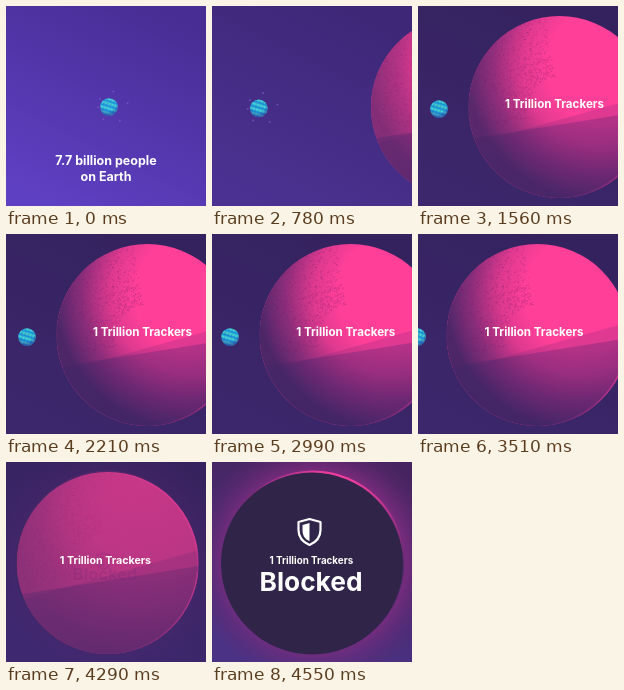
Recreate the animation shown at these times as an HTML page with a canvas. Size 200 by 200 pixels, loop 5870 ms.

```html
<!DOCTYPE html>
<html lang="en">
<head>
<meta charset="utf-8">
<title>Trackers</title>
<style>
html, body { margin: 0; width: 100%; height: 100%; overflow: hidden; background: #4a2f96; }
canvas { display: block; width: 200px; height: 200px; }
</style>
</head>
<body>
<canvas id="stage" width="200" height="200"></canvas>
<script>
const ctx = document.getElementById('stage').getContext('2d');
const LOOP = 5870, STEP = 130, LAST = 4550, TAU = Math.PI * 2, R = 91;

const ramp = (t, from, to) => Math.min(1, Math.max(0, (t - from) / (to - from)));
const ease = (t, from, to) => {
  const u = ramp(t, from, to);
  return u < .5 ? 4 * u ** 3 : 1 - 4 * (1 - u) ** 3;
};
const lerp = (a, b, k) => a + (b - a) * k;
const mix = (a, b, k) => `rgb(${a.map((v, i) => Math.round(lerp(v, b[i], k)))})`;

function fade(g, ...stops) {
  stops.forEach(([p, c]) => g.addColorStop(p, c));
  return g;
}
const linear = (x1, y1, x2, y2, ...stops) => fade(ctx.createLinearGradient(x1, y1, x2, y2), ...stops);
const radial = (x, y, r1, r2, ...stops) => fade(ctx.createRadialGradient(x, y, r1, x, y, r2), ...stops);

function disc(x, y, r, fill) {
  ctx.fillStyle = fill;
  ctx.beginPath();
  ctx.arc(x, y, r, 0, TAU);
  ctx.fill();
}

function text(str, x, y, size, alpha, color = '#fff') {
  ctx.globalAlpha = alpha;
  ctx.fillStyle = color;
  ctx.font = `700 ${size}px Inter, sans-serif`;
  ctx.textAlign = 'center';
  ctx.fillText(str, x, y);
  ctx.globalAlpha = 1;
}

let seed = 7;
const rand = () => (seed = seed * 16807 % 2147483647) / 2147483647;
const grain = Array.from({ length: 900 }, () => {
  const a = Math.PI * lerp(.9, 1.45, rand()), r = R - 60 * rand();
  return [Math.cos(a) * r, Math.sin(a) * r];
});

function sky(night) {
  ctx.fillStyle = linear(150, 0, 50, 200,
    [0, mix([72, 45, 148], [52, 34, 94], night)],
    [1, mix([94, 64, 194], [60, 39, 108], night)]);
  ctx.fillRect(0, 0, 200, 200);
}

function earth(x, y, dots) {
  ctx.save();
  ctx.translate(x, y);
  ctx.globalAlpha = dots;
  for (let i = 0; i < 6; i++) {
    const a = i * 1.1 - 2.4, r = 15 + 4 * Math.cos(a);
    disc(Math.cos(a) * r, Math.sin(a) * r, .9, '#7350c4');
  }
  ctx.globalAlpha = 1;
  ctx.beginPath();
  ctx.arc(0, 0, 8.8, 0, TAU);
  ctx.clip();
  ctx.rotate(.3);
  for (let band = -10; band < 10; band += 1) {
    ctx.fillStyle = mix([24, 150, 226], [70, 222, 214], .5 + .5 * Math.sin(band * 1.35));
    ctx.fillRect(-10, band, 20, 1.2);
  }
  disc(0, 0, 9, radial(-2, -4, 8, 14, [0, 'rgba(45,40,145,0)'], [1, 'rgba(45,40,145,.8)']));
  ctx.restore();
}

// Darkens everything below a slanted edge that starts on the left
function shadow(slope, fill) {
  ctx.fillStyle = fill;
  ctx.beginPath();
  ctx.moveTo(-R, 24 - slope * 50);
  ctx.lineTo(-40, 24);
  ctx.lineTo(R, 24 + slope * 131);
  ctx.lineTo(R, R);
  ctx.lineTo(-R, R);
  ctx.fill();
}

function planet(x, shade) {
  ctx.save();
  ctx.translate(x, 101);
  ctx.beginPath();
  ctx.arc(0, 0, R, 0, TAU);
  ctx.clip();
  ctx.fillStyle = '#ff3f98';
  ctx.fillRect(-R, -R, 2 * R, 2 * R);
  shadow(-.28, 'rgba(130,40,125,.25)');
  shadow(-.16, linear(0, 0, 15, R, [0, 'rgba(120,40,122,.35)'], [1, 'rgba(95,38,112,.65)']));
  ctx.globalAlpha = shade;
  disc(0, 0, R + 1, radial(45, -42, 58, 138,
    [0, 'rgba(80,36,106,0)'], [.3, 'rgba(90,34,106,.2)'], [.65, 'rgba(80,36,106,.68)'], [1, 'rgba(60,37,100,.97)']));
  ctx.globalAlpha = shade * .3;
  ctx.fillStyle = '#70236d';
  for (const [gx, gy] of grain) ctx.fillRect(gx, gy, 1, 1);
  // Lit rim on the lower right
  ctx.globalAlpha = .8;
  ctx.lineWidth = 3;
  ctx.strokeStyle = linear(80, 20, 10, 90, [0, '#e83c94'], [1, 'rgba(200,50,140,0)']);
  ctx.beginPath();
  ctx.arc(0, 0, R, .1, 1.5);
  ctx.stroke();
  ctx.restore();
}

function eclipse(k) {
  ctx.globalAlpha = k;
  ctx.fillStyle = linear(130, 0, 70, 200, [0, '#46245f'], [1, '#4b3285']);
  ctx.fillRect(0, 0, 200, 200);
  ctx.fillStyle = radial(103, 98, R - 3, 126, [0, 'rgba(134,44,130,.8)'], [1, 'rgba(90,40,110,0)']);
  ctx.fillRect(0, 0, 200, 200);
  disc(101, 100, R + .5, radial(130, 10, 15, 120, [0, '#ee3d9c'], [.5, '#a8308c'], [1, '#4b2a68']));
  disc(100, 101.5, R, '#302549');
  ctx.globalAlpha = 1;
}

function shield(y, scale, alpha, color) {
  ctx.save();
  ctx.globalAlpha = alpha;
  ctx.translate(97.5, y);
  ctx.scale(scale, scale);
  ctx.strokeStyle = ctx.fillStyle = color;
  ctx.lineWidth = 2.2;
  ctx.lineJoin = 'round';
  ctx.stroke(new Path2D('M0-13L11-10V-2C11 5 7 10 0 13C-7 10-11 5-11-2V-10Z'));
  ctx.fill(new Path2D('M0-9L-7-7V-2C-7 3-5 7 0 9Z'));
  ctx.restore();
}

function draw(t) {
  const arrive = ease(t, 0, 1365), pan = 40 * ease(t, 2450, 4500);
  const label = ramp(t, 1100, 1500), grow = ease(t, 4030, 4550), reveal = ramp(t, 4200, 4550);
  const shade = lerp(lerp(.65, .95, ramp(t, 1040, 1700)), .35, ease(t, 3500, 4350));

  sky(ramp(t, 0, 1400));
  earth(lerp(103, 21, arrive) - pan, 101 + 2 * arrive, 1 - ramp(t, 780, 1170));
  planet(lerp(486, 141.5, arrive) - pan, shade);
  eclipse(ramp(t, 4250, 4550));

  const intro = 1 - ramp(t, 130, 520);
  text('7.7 billion people', 100, 159, 12.5, intro);
  text('on Earth', 100, 174.5, 12.5, intro);

  const white = mix([120, 38, 120], [255, 255, 255], ramp(t, 4290, 4550));
  const scale = lerp(.25, 1, grow);
  shield(lerp(129, 70, grow), scale, reveal, white);
  text('Blocked', 99, lerp(108, 128.5, grow), 26.3 * scale, reveal, white);
  text('1 Trillion Trackers', 136.5 + 8 * (1 - label) - pan * .93, 102, lerp(11.6, 9.8, grow), label);
}

const start = performance.now();
function tick() {
  const t = (performance.now() - start) % LOOP;
  draw(Math.min(LAST, Math.floor(t / STEP) * STEP));
  requestAnimationFrame(tick);
}
tick();
</script>
</body>
</html>
```
